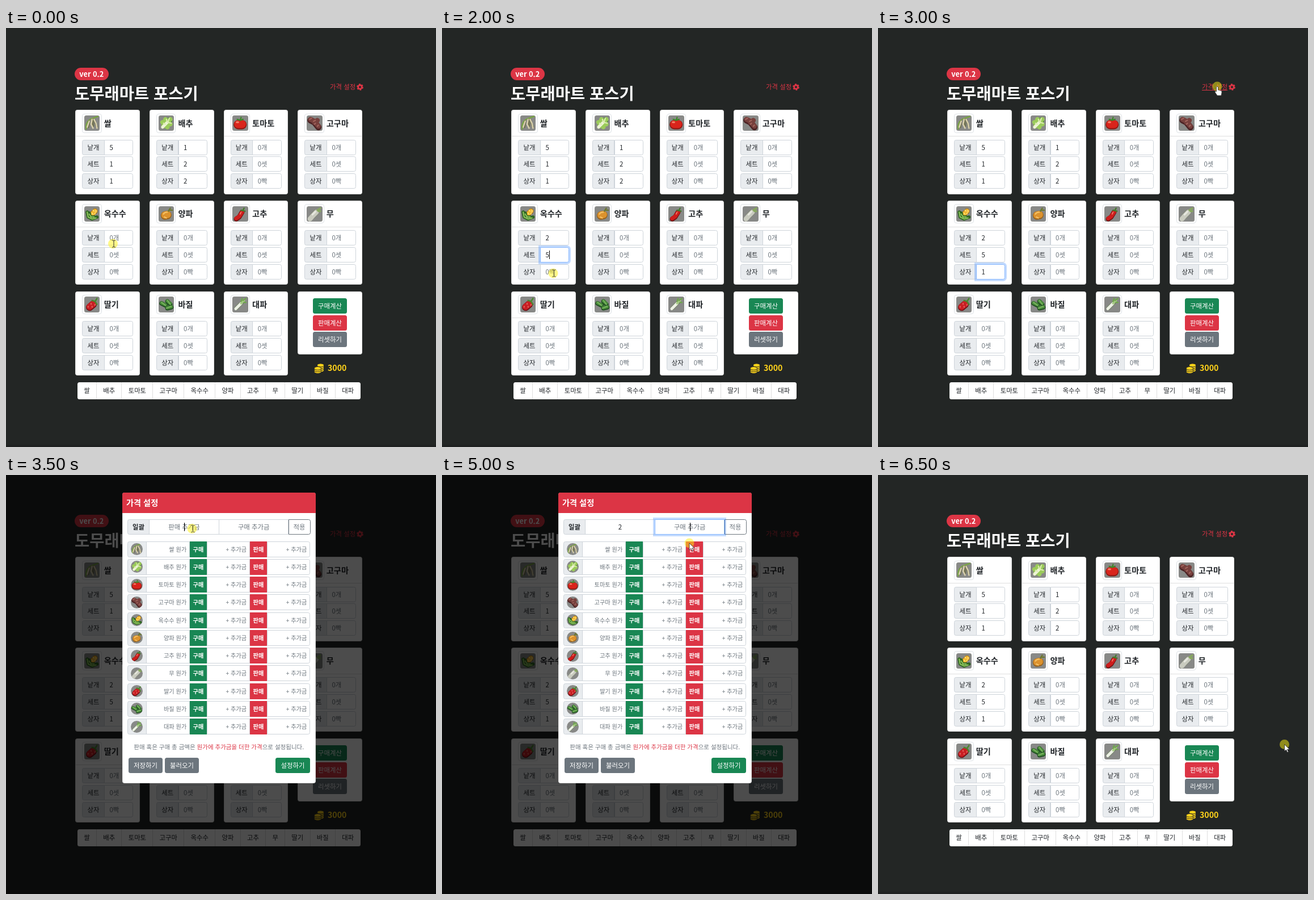
Write an HTML page that moves like this. It is 758x738 px and loops after 7 s.

```html
<!DOCTYPE html>
<html lang="ko">
<head>
<meta charset="utf-8">
<style>
html, body { margin: 0; width: 100%; height: 100%; overflow: hidden; background: #232625; }
body { position: relative; color: #212529; font: 11.4px "Noto Sans CJK KR", "Noto Sans CJK JP", "Noto Sans", sans-serif; }
body * { box-sizing: border-box; }
.box, .caret { position: absolute; white-space: pre; }
.card { background: #fff; border-radius: 3.5px; border: 1px solid #dfdfdf; }
.line { background: #dfdfdf; }
.thumb { background: #fff; border: 1px solid #dee2e6; border-radius: 4px; }
.name { font-size: 14.2px; font-weight: bold; }
.heavy { font-weight: 900; }
.label, .field { border: 1px solid #ced4da; }
.label { background: #e9ecef; text-align: center; border-radius: 3.5px 0 0 3.5px; }
.field { background: #fff; padding-left: 8.5px; }
.end { border-radius: 0 3.5px 3.5px 0; }
.center { text-align: center; padding: 0; }
.right { text-align: right; padding: 0 5px; font-size: 10.2px; }
.hint { color: #6c757d; }
.btn { color: #fff; font-weight: 500; text-align: center; border-radius: 3.5px; }
.tag { color: #fff; font-weight: bold; font-size: 10.2px; text-align: center; }
.green { background: #198754; }
.red { background: #dc3545; }
.gray { background: #6c757d; }
.link { color: #dc3545; }
.tabs { display: flex; background: #fff; border-radius: 3.5px; overflow: hidden; }
.tabs span { flex: 1 1 auto; text-align: center; border-left: 1px solid #dfdfdf; }
.tabs span:first-child { border-left: 0; }
.caret { width: 1px; height: 15px; top: 5px; background: #000; }
svg { position: absolute; left: 0; top: 0; display: block; overflow: hidden; }
#badge { border-radius: 11px; color: #fff; font-size: 12.8px; font-weight: bold; text-align: center; }
#title { color: #fff; font-size: 28.5px; font-weight: bold; }
#total { color: #ffd31a; }
#shade { background: rgba(0,0,0,.7); }
#heading { color: #fff; padding-left: 7px; border-radius: 3.5px 3.5px 0 0; }
#note { font-size: 10.5px; }
#apply { border-color: #6c757d; }
#cursor { z-index: 2; }
#cursor svg { overflow: visible; }
</style>
</head>
<body>
<script>
const names = ['쌀', '배추', '토마토', '고구마', '옥수수', '양파', '고추', '무', '딸기', '바질', '대파'];
const units = [['낱개', '0개'], ['세트', '0셋'], ['상자', '0빡']];
const stock = { 쌀: [5, 1, 1], 배추: [1, 2, 2] };

// Each stroke: colour, width, path on a 16-unit grid.
const art = [
  [['#77a83c', 1.2, 'M2 14Q1 6 8 3L14 1'], ['#6f7050', 2.2, 'M5 6L4 12M8 4L9 11M10 4L13 12'], ['#d8cfad', 1.5, 'M5 6L3 12M8 4L7 9L9 13M10 4L12 8L13 13']],
  [['#3f7c2c', 6, 'M6 10L11 5'], ['#9bcb5a', 4.5, 'M5 11L12 4M4 7L9 12M7 4L12 9'], ['#eef4d6', 3, 'M4 12L9 7'], ['#dcecb2', 1.2, 'M8 4L9 7L13 8M5 8L7 9M11 3L10 6']],
  [['#8f1712', 9.5, 'M6 9.5L10 9.5'], ['#d9241c', 8, 'M6 9L10 9'], ['#f4836b', 1.8, 'M4.5 7L6 7'], ['#3f8629', 1.3, 'M5 4L8 5L11 4M8 5L9 2']],
  [['#4c2325', 6.5, 'M4 5L8 7L12 12'], ['#77403d', 5, 'M4 4L8 6L12 11M11 5L8 7'], ['#a3665f', 1.2, 'M3 4L5 3M7 6L9 5M8 9L9 8M11 11L12 10']],
  [['#9a6812', 5.5, 'M7 9L11 5'], ['#f1b52d', 4.5, 'M7 9L11 5'], ['#ffe27b', 1, 'M9 4L10 5M12 4L12 6M8 7L9 8M11 7L11 8'], ['#2d6422', 3.4, 'M3 6L4 11L8 13L13 11M5 7L6 11L10 11'], ['#8cc25a', 1.3, 'M3 6L4 11L8 13L12 12M5 8L7 11L10 11']],
  [['#95601b', 8.6, 'M6.5 9.5L9 9'], ['#dc922d', 7.4, 'M6.5 9L9 8.5'], ['#f5c163', 1.3, 'M5 8Q6 6 9 6M6 11L8 12'], ['#6c7832', 1.4, 'M10 5L12 2M11 4L14 4']],
  [['#711010', 5, 'M4 13L7 11L10 6'], ['#ce1d1c', 4, 'M4 12.5L7 10.5L10 6'], ['#f37967', 1, 'M8 8L9 6'], ['#437b2d', 1.4, 'M9 4L13 5M11 4L12 2']],
  [['#85897e', 6.5, 'M6 10L10 6'], ['#c9cbbf', 5, 'M6 10L10 6M3.5 13L6 10'], ['#e7e8df', 1.8, 'M6 8.5L9 5.5'], ['#87a85e', 1.8, 'M11 4L14 2M12 5L14 5']],
  [['#6d0d12', 7.5, 'M5.5 11L9 8'], ['#c91f24', 6.5, 'M5.5 10.5L9 7.5'], ['#f08476', .8, 'M4 10L4 11M7 7L7 8M8 10L8 11M11 8L11 9'], ['#4a882f', 1.5, 'M8 4L11 5L13 8M11 5L13 2']],
  [['#214f22', 4.5, 'M3 7L7 9M9 5L12 8M9 12L13 11'], ['#4b8f3c', 3.2, 'M3 6.5L7 8.5M9 4.5L12 7M9 11.5L13 10.5'], ['#82b965', .9, 'M3 6L7 9M9 4L12 8M8 12L13 10']],
  [['#6e8061', 4, 'M4 12L10 6'], ['#edf1e5', 3, 'M3.5 12.5L9 7'], ['#a5ca83', 2.2, 'M9 7L12 4'], ['#6ea84a', 1.3, 'M9 5L10 2M11 4L14 2M12 6L14 6']]
];

const icon = (i, size, radius) =>
  `<svg width="${size}" height="${size}" viewBox="0 0 16 16" fill="none" stroke-linecap="round" stroke-linejoin="round" style="background:#888987;border-radius:${radius}">` +
  art[i].map(([color, width, d]) => `<path d="${d}" stroke="${color}" stroke-width="${width}"/>`).join('') + '</svg>';

const box = (x, y, w, h, cls = '', content = '', attrs = '') =>
  `<div class="box ${cls}" ${attrs} style="left:${x}px;top:${y}px;width:${w}px;height:${h}px;line-height:${h - (/label|field/.test(cls) ? 2 : 0)}px">${content}</div>`;

function card(name, i) {
  const x = 122.2 + i % 4 * 130.7, y = 144 + Math.floor(i / 4) * 159.8;
  let html = box(x, y, 113.7, 148.5, 'card') + box(x, y + 46, 113.7, 1, 'line') +
    box(x + 12, y + 6.5, 34.5, 34, 'thumb') + box(x + 15.7, y + 9.7, 27.5, 27.5, '', icon(i, 27.5, '3.5px')) +
    box(x + 50.5, y + 9.5, 60, 27, 'name heavy', name);
  units.forEach(([unit, hint], row) => {
    const top = y + 52.5 + row * 29.8, value = stock[name]?.[row];
    html += box(x + 12, top, 39.5, 27, 'label', unit) +
      box(x + 50.7, top, 51.5, 27, 'field end' + (value ? '' : ' hint'), value || hint, name === '옥수수' ? `id="corn${row}"` : '');
  });
  return html;
}

const coin = (x, y) => `<ellipse cx="${x}" cy="${y}" rx="6.2" ry="3"/>`;
const page =
  box(0, 734, 758, 4, '', '<div style="height:4px;background:#1f2121"></div>') +
  box(121, 70, 59.5, 22, 'red', 'ver 0.2', 'id="badge"') +
  box(121, 93, 260, 41, '', '도무래마트 포스기', 'id="title"') +
  box(571, 94, 46, 19, 'link', '가격 설정', 'id="settings"') +
  box(617, 97, 14, 14, '', `<svg width="14" height="14" fill="none" stroke="#dc3545">
    <circle cx="7" cy="7" r="3.3" stroke-width="2.8"/><circle cx="7" cy="7" r="5" stroke-width="1.8" stroke-dasharray="2.8 2.436"/></svg>`) +
  names.map(card).join('') +
  box(514.3, 463.6, 113.7, 111, 'card') +
  [['구매계산', 'green'], ['판매계산', 'red'], ['리셋하기', 'gray']].map(([text, color], i) =>
    box(541, 475.8 + i * 29.8, 60, 27, 'btn ' + color, text)).join('') +
  box(541, 588, 24, 24, '', `<svg width="24" height="24" fill="#ffd31a" stroke="#232625">${
    [[13.5, 15], [13.5, 12], [13.5, 9], [13.5, 6], [8.5, 17.5], [8.5, 14.5], [8.5, 11.5]].map(p => coin(...p)).join('')}</svg>`) +
  box(567, 588, 40, 21, 'name', '3000', 'id="total"') +
  box(126, 624, 498.5, 29.7, 'tabs', names.map(name => `<span>${name}</span>`).join(''));

const modal = '<div id="modal">' + box(0, 0, 758, 738, '', '', 'id="shade"') +
  box(205, 31, 340.5, 512, 'card') +
  box(205, 31, 340.5, 35.5, 'red name', '가격 설정', 'id="heading"') +
  box(214, 77.5, 39, 27, 'label', '<b>일괄</b>') +
  box(252, 77.5, 124, 27, 'field center hint', '판매 추가금', 'id="sell"') +
  box(375.2, 77.5, 123, 27, 'field center hint', '구매 추가금', 'id="buy"') +
  box(497.5, 77.5, 39, 27, 'field center end hint', '적용', 'id="apply"') +
  names.map((name, i) => {
    const y = 116.5 + i * 31.25;
    return box(214, y, 34, 28, 'label') + box(220.3, y + 3.5, 21, 21, '', icon(i, 21, '50%')) +
      box(247.3, y, 77, 28, 'field right hint', name + ' 원가') + box(323.7, y, 30.5, 28, 'tag green', '구매') +
      box(354, y, 76, 28, 'field right hint', '+ 추가금') + box(429.7, y, 30.5, 28, 'tag red', '판매') +
      box(460, y, 76.3, 28, 'field right hint end', '+ 추가금');
  }).join('') +
  box(205, 469, 340.5, 19, 'center hint', '판매 혹은 구매 총 금액은 <span class="link">원가에 추가금을 더한 가격</span>으로 설정됩니다.', 'id="note"') +
  box(216, 498, 60, 27, 'btn gray', '저장하기') + box(280, 498, 60, 27, 'btn gray', '불러오기') +
  box(475.3, 498, 60.3, 27, 'btn green', '설정하기', 'id="confirm"') + '</div>';

const pointers = {
  beam: '<path d="M-3-6H-1L0-5L1-6H3M0-5V5M-3 6H-1L0 5L1 6H3" fill="none" stroke="#333"/>',
  hand: '<path d="M-1.5 1Q0-1 1.5 1V6L7 7.5Q8.5 8 8 11L7 16H0L-4 10Q-4 7-1.5 9Z" fill="#fff" stroke="#333" stroke-width=".8"/>',
  arrow: '<path d="M0 0V12L3 9.5L5 14L7 13L5 8.8H9Z" fill="#fff" stroke="#222" stroke-width=".8"/>'
};

document.body.innerHTML = page + modal + box(0, 0, 758, 738, '', '', 'id="cursor"');

const el = id => document.getElementById(id);
const STEP = 500;

// pointer, x, y, outlined field, outline strength, field with caret
const steps = [
  ['beam', 190, 380],
  ['beam', 191, 387, 'corn0', .5, 'corn0'],
  ['beam', 192, 393, 'corn0', 1, 'corn0'],
  ['beam', 196, 418, 'corn1', 1, 'corn1'],
  ['beam', 197.5, 432, 'corn1', 1, 'corn1'],
  ['beam', 197.5, 432, 'corn2', .7, 'corn2'],
  ['hand', 598, 103, 'corn2', 1],
  ['beam', 329.5, 94.5, '', 0, 'sell'],
  ['beam', 331, 95, 'sell', 1, 'sell'],
  ['beam', 425, 95, 'sell', 1, 'buy'],
  ['arrow', 436, 120, 'buy', 1, 'buy'],
  ['arrow', 437, 121, 'buy', 1],
  ['hand', 521, 505.5, 'buy', 1],
  ['arrow', 716.5, 474.5]
];
// hint, typed value, step at which it appears
const fields = {
  corn0: ['0개', '2', 2], corn1: ['0셋', '5', 4], corn2: ['0빡', '1', 6],
  sell: ['판매 추가금', '2', 9], buy: ['구매 추가금', '15', 11]
};

function render(step) {
  const [pointer, x, y, ring, strength, caret] = steps[step];
  for (const [id, [hint, value, from]] of Object.entries(fields)) {
    const node = el(id), typed = step >= from, focused = id === ring;
    const left = id.startsWith('corn') ? 8.5 + (typed ? value.length * 6.3 : 0) + 'px' : '50%';
    node.innerHTML = (typed ? value : hint) + (id === caret ? `<i class="caret" style="left:${left}"></i>` : '');
    node.classList.toggle('hint', !typed);
    node.style.borderColor = focused ? '#86b7fe' : '';
    node.style.boxShadow = focused ? `0 0 0 3px rgba(13,110,253,${.25 * strength})` : '';
    node.style.zIndex = focused ? 1 : '';
  }
  const open = step >= 7 && step <= 12;
  el('modal').style.display = open ? '' : 'none';
  el('settings').style.textDecoration = step === 6 ? 'underline' : '';
  el('confirm').style.background = step === 12 ? '#157347' : '';
  const glow = step === 9 ? '' : `<circle cx="${pointer === 'beam' ? -1.5 : 0}" r="8.5" fill="rgba(255,242,20,.5)"/>`;
  el('cursor').innerHTML = `<svg width="758" height="738"><g transform="translate(${x} ${y})">${glow}${pointers[pointer]}</g></svg>`;
}

const start = performance.now();
let shown = -1;
function tick() {
  const step = Math.floor((performance.now() - start) / STEP) % steps.length;
  if (step !== shown) render(shown = step);
  requestAnimationFrame(tick);
}
tick();
</script>
</body>
</html>
```
